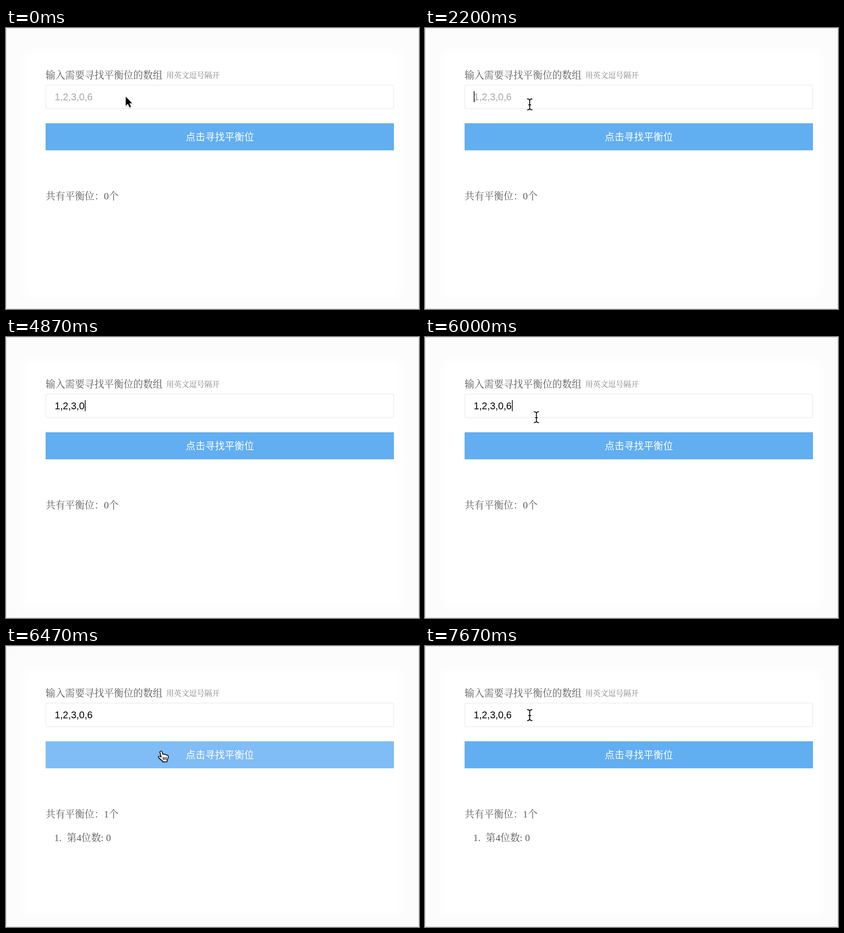
An HTML page that plays this animation: 907x618 px, repeating every 8 s.

```html
<!DOCTYPE html>
<html lang="zh-CN">
<head>
<meta charset="utf-8">
<title>平衡位</title>
<style>
html, body { margin: 0; width: 100%; height: 100%; overflow: hidden; background: #fff; }
svg { display: block; width: 100%; height: 100%; }
text { white-space: pre; }
.serif { font: 21.4px "Liberation Serif", "Noto Serif CJK SC", "Noto Sans CJK SC", serif; fill: #5a5a5a; }
.sans { font: 21.4px "Liberation Sans", "Noto Sans CJK SC", sans-serif; }
</style>
</head>
<body>
<svg viewBox="0 0 907 618" lang="zh-CN">
  <defs>
    <filter id="soft" x="-10%" y="-10%" width="120%" height="120%"><feGaussianBlur stdDeviation="9"/></filter>
    <filter id="shade" x="-50%" y="-50%" width="200%" height="200%">
      <feDropShadow dx="0" dy="1" stdDeviation="1" flood-opacity=".35"/>
    </filter>
  </defs>
  <rect x=".5" y=".5" width="906" height="617" rx="3" fill="#fcfcfc"/>
  <rect x="38" y="50" width="831" height="543" rx="12" fill="#fff" filter="url(#soft)"/>
  <rect x=".5" y=".5" width="906" height="617" rx="3" fill="none" stroke="#d0d0d0"/>

  <text class="serif" x="87" y="110.5" font-weight="500" style="font-weight:500">输入需要寻找平衡位的数组</text>
  <text class="serif" x="352" y="110" style="font-size:16.75px;fill:#808080">用英文逗号隔开</text>

  <rect x="87.5" y="125.5" width="764" height="52" rx="2.5" fill="#fff" stroke="#e4e4e4"/>
  <text id="field" class="sans" x="107" y="158.5"></text>
  <rect id="caret" y="139" width="1.6" height="24"/>

  <rect id="button" x="87" y="209.5" width="765" height="59.5"/>
  <text class="sans" x="469.7" y="246.5" text-anchor="middle" fill="#fff">点击寻找平衡位</text>

  <text class="serif" x="87" y="377">共有平衡位：</text>
  <text id="count" class="serif" x="215" y="377"></text>
  <g id="list" class="serif">
    <text x="106" y="429">1.</text>
    <text x="133.5" y="429">第4位数: 0</text>
  </g>

  <g id="arrow" filter="url(#shade)">
    <path d="M0 0V20L4.7 15.8 8.2 23.6 11.5 22.2 8.1 14.6H14Z" stroke="#fff" stroke-width="2" paint-order="stroke"/>
  </g>
  <g id="beam" fill="none" stroke-linecap="round">
    <path d="M-5-12Q-.6-12 0-8.5Q.6-12 5-12M0-8.5V8.5M-5 12Q-.6 12 0 8.5Q.6 12 5 12M-2.3 1H2.3" stroke="#fff" stroke-width="3.6"/>
    <path d="M-5-12Q-.6-12 0-8.5Q.6-12 5-12M0-8.5V8.5M-5 12Q-.6 12 0 8.5Q.6 12 5 12M-2.3 1H2.3" stroke="#000" stroke-width="1.8"/>
  </g>
  <g id="hand" filter="url(#shade)" stroke="#000" stroke-linejoin="round" stroke-linecap="round">
    <path transform="translate(-6 -1)" fill="#fff" stroke-width="1.6" d="M4 3C4.5 .3 7.7 .3 8.7 3L10.8 8.7C12 7.2 14.3 7.4 15 9.2C16.2 8 18.3 8.4 18.8 10.3C20.5 9.5 22 10.5 22.2 12.5C22.4 15.5 21.5 18 19.8 20.5L19.5 24.2 10.5 24.6C9 21.2 4 18.8 1 15C.2 12.8 2.2 11.4 4.5 12.8L6.9 14.3Z"/>
    <path transform="translate(-6 -1)" fill="none" stroke-width="1.5" d="M11.3 14.8V20M14.4 14.8V20M17.5 14.8V20"/>
  </g>
</svg>
<script>
const LOOP = 8000, VALUE = '1,2,3,0,6', PRESS = 6400;
const CLICK = 1100, HIDE = 2670, SHOW = 5930;
const typed = [2670, 3000, 3130, 3400, 3700, 4070, 4870, 5600, 5800];
const caretOff = [[0, CLICK], [1600, 2070], [2600, 2670], [4530, 4870], [5270, 5600], [6330, LOOP]];
// pointer stops: time, x, y
const stops = [[70, 263, 151], [200, 258, 158], [800, 258, 158], [1200, 230, 168],
  [SHOW, 230, 168], [6240, 340, 231], [6930, 340, 231], [7630, 230, 152]];

const el = {};
document.querySelectorAll('svg [id]').forEach(n => el[n.id] = n);
const show = (node, on) => node.setAttribute('visibility', on ? 'visible' : 'hidden');
const ease = k => k * k * (3 - 2 * k);

function pointerAt(t) {
  const i = stops.findIndex(s => s[0] > t);
  if (i === 0) return stops[0].slice(1);
  if (i < 0) return stops[stops.length - 1].slice(1);
  const a = stops[i - 1], b = stops[i];
  const k = ease((t - a[0]) / (b[0] - a[0]));
  return [a[1] + (b[1] - a[1]) * k, a[2] + (b[2] - a[2]) * k];
}

function draw(t) {
  const n = typed.filter(at => at <= t).length;
  const text = VALUE.slice(0, n);
  el.field.textContent = text || VALUE;
  el.field.setAttribute('fill', n ? '#000' : '#a6a6a6');

  // digits are twice as wide as commas
  const width = [...text].reduce((w, c) => w + (c === ',' ? 5.95 : 11.9), 0);
  el.caret.setAttribute('x', 107 + width + (n ? .6 : 0));
  show(el.caret, !caretOff.some(([a, b]) => t >= a && t < b));

  const [x, y] = pointerAt(t);
  const visible = t < HIDE || t >= SHOW;
  const onButton = visible && y >= 209 && y < 269;
  const onField = y > 125 && y < 178 && t >= 130;
  const kind = onButton ? 'hand' : onField ? 'beam' : 'arrow';
  for (const id of ['arrow', 'beam', 'hand']) {
    show(el[id], visible && id === kind);
    el[id].setAttribute('transform', `translate(${x} ${y})`);
  }
  el.button.setAttribute('fill', onButton ? '#80bcf5' : '#61aef1');

  const done = t >= PRESS;
  el.count.textContent = (done ? 1 : 0) + '个';
  show(el.list, done);
}

const start = performance.now();
function tick() {
  draw((performance.now() - start) % LOOP);
  requestAnimationFrame(tick);
}
tick();
</script>
</body>
</html>
```
